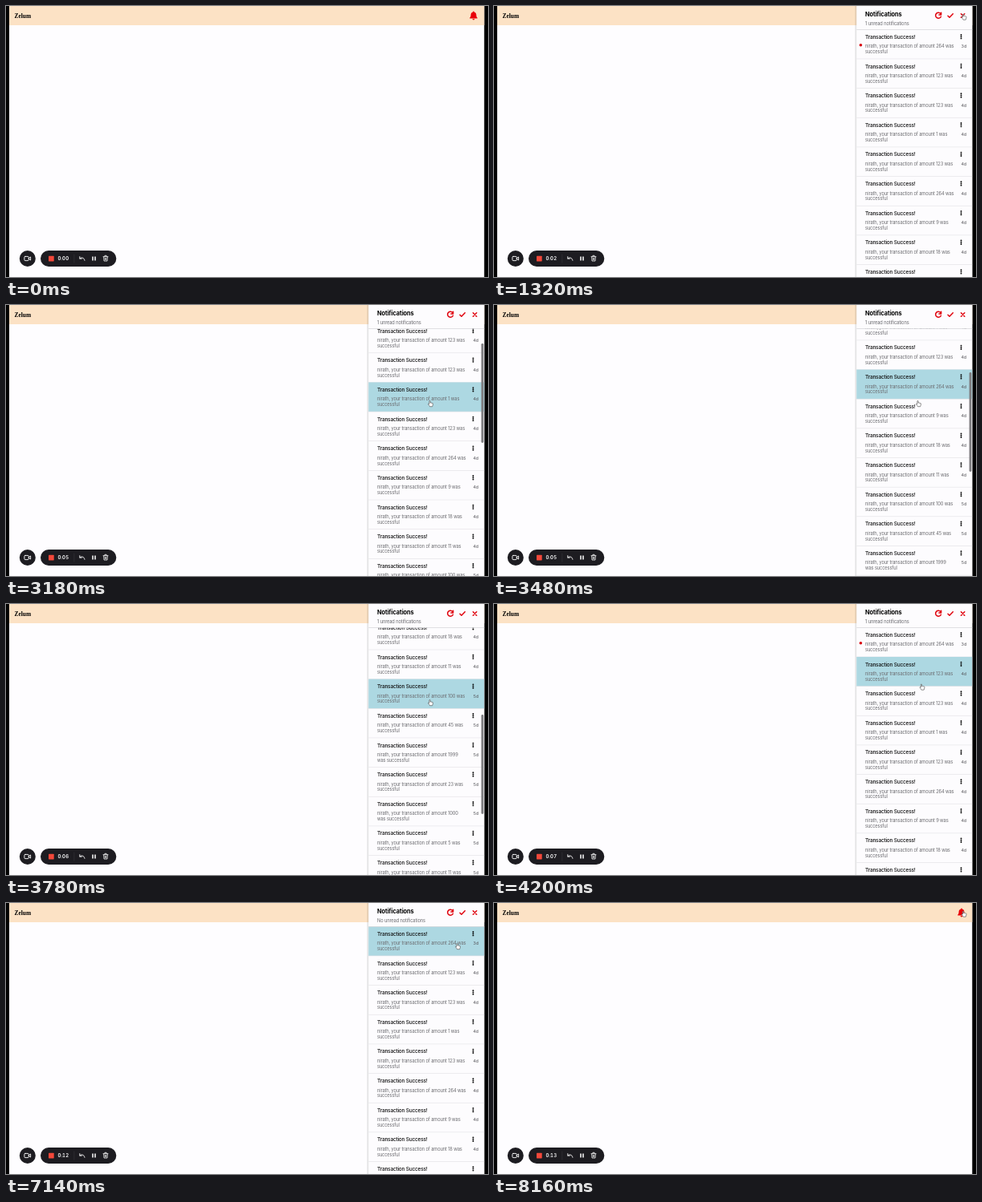
Animation, 600 px wide and 338 px high, one loop 8220 ms. Source, as an HTML page:

```html
<!DOCTYPE html>
<html lang="en">
<head>
<meta charset="utf-8">
<title>Notification panel</title>
<style>
  html, body { margin: 0; width: 100%; height: 100%; overflow: hidden; background: #000; }
  svg { display: block; width: 600px; height: 338px; font-family: Inter, "Liberation Sans", sans-serif; }
  .brand { font: bold 7.4px "Liberation Serif", "Times New Roman", serif; }
  .head { font-size: 7.4px; font-weight: 700; letter-spacing: -.01em; }
  .title { font-size: 6.57px; font-weight: 500; letter-spacing: -.037em; fill: #111; }
  .body { font-size: 5.74px; letter-spacing: -.026em; fill: #6b6b6f; }
  .age { font-size: 5.4px; text-anchor: end; fill: #55555a; }
  .clock { font-size: 6px; font-weight: 600; letter-spacing: .02em; fill: #fff; font-feature-settings: "tnum"; }
  .line { fill: none; stroke-linecap: round; stroke-linejoin: round; }
</style>
</head>
<body>
<svg viewBox="0 0 600 338" xmlns="http://www.w3.org/2000/svg">
  <defs>
    <clipPath id="listClip"><rect x="451" y="29.3" width="144.5" height="309"/></clipPath>
    <linearGradient id="shade">
      <stop offset="0" stop-color="#000" stop-opacity="0"/>
      <stop offset="1" stop-color="#000" stop-opacity=".16"/>
    </linearGradient>
  </defs>

  <rect width="600" height="338" fill="#000"/>
  <rect x="4" width="591.3" height="338" fill="#fefdff"/>
  <rect x="4" width="591.3" height="24" fill="#fce2c5"/>
  <text class="brand" x="10.6" y="14.6">Zelum</text>
  <g fill="#e90008">
    <path d="M582 6.6c.5 0 .8.4.8.9 1.6.4 2.6 1.6 2.6 3.4 0 2 .5 2.8 1.2 3.5.4.4.1 1-.5 1h-8.200c-.6 0-.9-.6-.5-1 .7-.7 1.200-1.500 1.200-3.500 0-1.800 1-3 2.600-3.400 0-.5.300-.9.800-.9z"/>
    <path d="M580.600 16h2.800a1.400 1.400 0 0 1-2.800 0z"/>
  </g>

  <g id="panel">
    <rect x="448.500" width="3" height="338" fill="url(#shade)"/>
    <rect x="451.300" width="144" height="338" fill="#fdfcfe"/>
    <g id="list" clip-path="url(#listClip)"><g id="rows"></g></g>
    <rect x="451.300" y="29" width="144" height=".7" fill="#d5d4d8"/>
    <text class="head" x="462" y="13.300">Notifications</text>
    <text class="body" id="unread" x="462" y="23.700"></text>
    <g class="line" stroke="#e0050f" stroke-width="1.500">
      <path d="M556 9.700a3.500 3.500 0 1 0 .4 3.500M556.600 8.200v2.700h-2.700"/>
      <path d="M565 12.200l2 2 4.300-4.400"/>
      <path d="M581.400 9.800l4.400 4.400M585.800 9.800l-4.400 4.400"/>
    </g>
    <rect id="bar" x="591.600" width="2.800" height="124" rx="1.400" fill="#7c7b7e"/>
  </g>

  <g fill="#1d1c21">
    <circle cx="26.800" cy="315" r="10"/>
    <rect x="43" y="305" width="94.300" height="20" rx="10"/>
  </g>
  <g class="line" stroke="#fff" stroke-width=".9">
    <rect x="22.900" y="312.400" width="5.300" height="5.200" rx="1"/>
    <path d="M28.300 314.500l2.300-1.500v4l-2.300-1.500"/>
    <path d="M91.800 312.600v2.500h2.500M92 315c1.500-1.800 5.300-1.500 5.900 2.300"/>
    <path d="M108 312.500v5M111 312.500v5" stroke-width="1.500" stroke-linecap="butt"/>
    <path d="M121 312.700h6M122.900 312.500v-1.200h2.200v1.200M121.700 313l.3 5h4l.3-5M123.300 314.500v2M124.700 314.500v2" stroke-width=".8"/>
  </g>
  <rect x="53" y="311.700" width="6.700" height="6.700" rx=".6" fill="#f4483a"/>
  <rect x="84.600" y="309.500" width=".6" height="11" fill="#38373d"/>
  <text class="clock" id="clock" x="64.400" y="317.200"></text>

  <g id="cursor" stroke-linejoin="round">
    <path id="arrow" d="M0 0v5.500l1.300-1.200.9 2 .9-.4-.9-1.900h1.700z" fill="#111" stroke="#fff" stroke-width=".5"/>
    <path id="hand" d="M-.600.600c0-.9 1.200-.9 1.200 0v2c.4-.4 1-.3 1.200.1.400-.3.900-.2 1.100.2.500-.2 1 .1 1 .6v1.300c0 1.200-.7 1.400-.7 2.400h-3.100c-.3-1-1.300-1.700-1.900-2.800-.4-.8.500-1.100 1.200-.3z" fill="#fff" stroke="#333" stroke-width=".55"/>
  </g>
</svg>
<script>
const LOOP = 8220, STEP = 60;
const TOP = 29.3, PITCH = 36.65;
const OPEN = 1080, CLOSE = 7860, READ = 6600;
const amounts = [264, 123, 123, 1, 123, 264, 9, 18, 11, 100, 45, 1999, 23, 1000, 5, 11];

// [time, x, y] of the pointer tip
const path = [
  [300, 534, 76], [480, 534, 76], [600, 584, 10], [1620, 584, 10],
  [1920, 545, 58], [2040, 545, 58], [2700, 527.5, 81.5], [2820, 527.5, 96],
  [2880, 527.5, 96], [3000, 527.5, 119.5], [4080, 527.5, 119.5],
  [4740, 552, 12], [5100, 552, 12], [5340, 580.2, 25.7], [5640, 581, 37],
  [5940, 573, 45], [6600, 561.5, 50.5], [7500, 561.5, 50.5], [7740, 584, 10]
];
// [time, offset] of the list
const scroll = [[2880, 0], [3120, 25], [3480, 132], [3720, 265.5], [3780, 265.5], [3960, 0]];

const $ = id => document.getElementById(id);
const show = (el, on) => el.setAttribute("display", on ? "inline" : "none");

function at(keys, t, k = 1) {
  if (t <= keys[0][0]) return keys[0][k];
  for (let i = 1; i < keys.length; i++) {
    const a = keys[i - 1], b = keys[i];
    if (t <= b[0]) return a[k] + (b[k] - a[k]) * (t - a[0]) / (b[0] - a[0]);
  }
  return keys[keys.length - 1][k];
}

function rowMarkup(n, i) {
  const long = n > 999;
  const age = i === 0 ? 3 : i < 9 ? 4 : 5;
  const dots = [6.7, 8.9, 11.1].map(y => `<circle cx="581.5" cy="${y}" r=".95"/>`).join("");
  return `<g transform="translate(0 ${TOP + i * PITCH})">
    <rect class="fill" x="451.3" width="144" height="${PITCH}" fill="#add8e2"/>
    <rect x="451.3" y="${PITCH - .3}" width="144" height=".6" fill="#e2e1e5"/>
    <text class="title" x="462" y="11.6">Transaction Success!</text>
    <text class="body" x="462" y="23">nirath, your transaction of amount ${n}${long ? "" : " was"}</text>
    <text class="body" x="462" y="29.8">${long ? "was " : ""}successful</text>
    <text class="age" x="588.2" y="23">${age}d</text>${dots}
  </g>`;
}

$("rows").innerHTML = amounts.map(rowMarkup).join("") +
  '<circle id="dot" cx="456.5" cy="48.7" r="1.8" fill="#d8000c"/>';
const fills = [...document.querySelectorAll(".fill")];

function draw(time) {
  const t = Math.floor(time % LOOP / STEP) * STEP;
  const open = t >= OPEN && t < CLOSE;
  const x = at(path, t, 1), y = at(path, t, 2), offset = at(scroll, t);

  show($("panel"), open);
  $("rows").setAttribute("transform", `translate(0 ${-offset})`);
  $("bar").setAttribute("y", 30.6 + offset * .4045);
  show($("bar"), t >= 2940 && t < 4200);
  show($("dot"), t < READ);
  $("unread").textContent = (t < READ ? "1" : "No") + " unread notifications";

  // hover trails the scrolling list by one step
  const inList = open && x > 451 && y > TOP;
  const over = inList ? Math.floor((y + at(scroll, t - STEP) - TOP) / PITCH) : -1;
  fills.forEach((el, i) => show(el, i === over));

  const onIcon = y < 18 && x > (open ? 547 : 576);
  const pointing = inList || onIcon;
  show($("cursor"), t >= 300);
  show($("hand"), pointing);
  show($("arrow"), !pointing);
  $("cursor").setAttribute("transform", `translate(${x} ${y})`);

  const sec = Math.floor(t * 1.6915 / 1000);
  $("clock").textContent = "0:" + String(sec).padStart(2, "0");
}

const start = performance.now();
function tick() {
  draw(performance.now() - start);
  requestAnimationFrame(tick);
}
tick();
</script>
</body>
</html>
```
